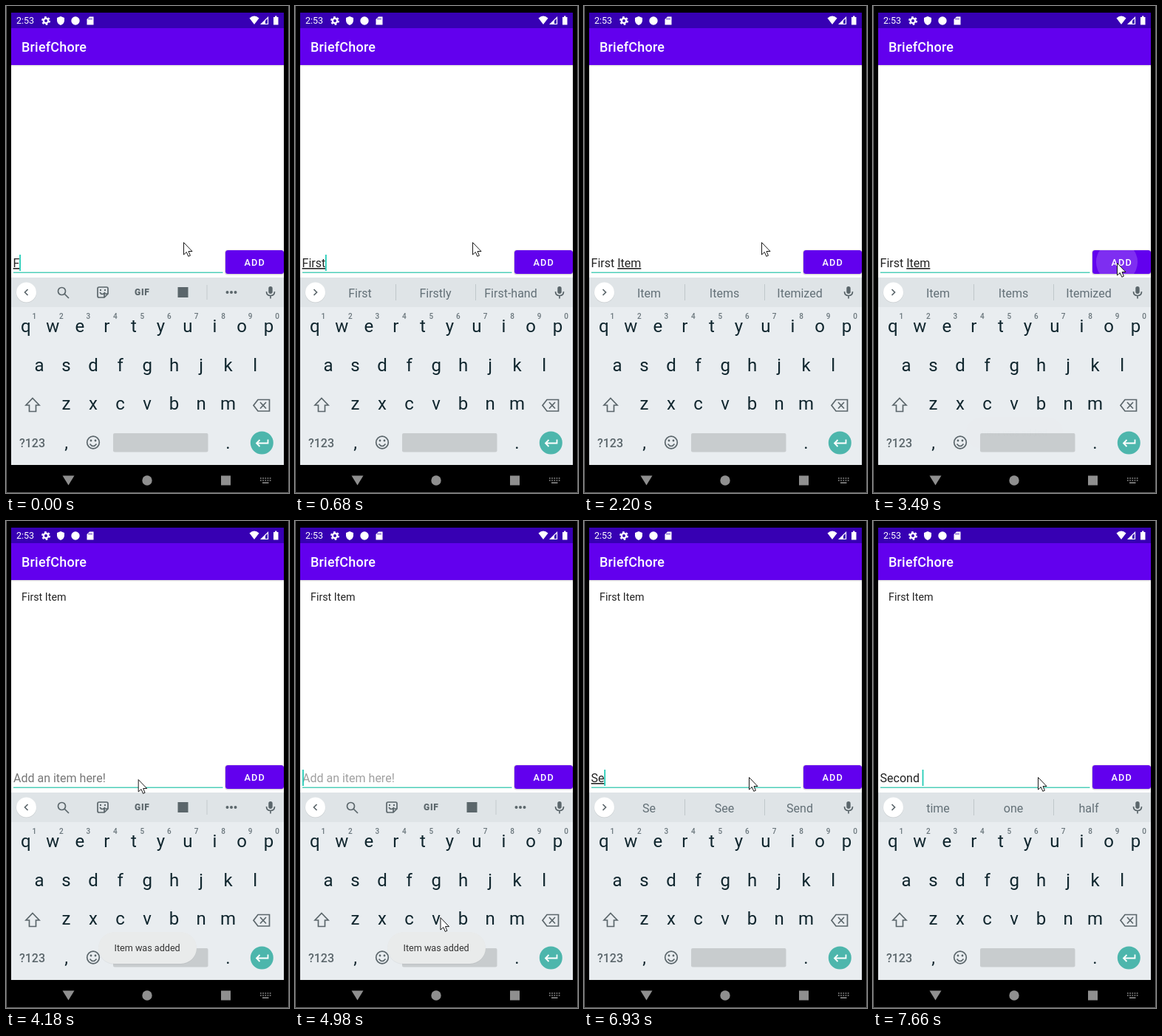
These frames come from a looping animation (383x660 px, 8 s). An HTML page:

```html
<!DOCTYPE html>
<html lang="en">
<head>
<meta charset="utf-8">
<title>Todo app</title>
<style>
  html, body { margin: 0; width: 100%; height: 100%; overflow: hidden; background: #000; }
  svg { display: block; width: 383px; height: 660px; }
  text { font-family: Roboto, "Noto Sans", sans-serif; white-space: pre; }
  .mid { text-anchor: middle; }
  .line { fill: none; stroke: #5b666b; stroke-width: 1.7; }
  .key { font-size: 24px; fill: #10262e; }
  .num { font-size: 10px; font-weight: 500; fill: #69757b; }
  .sug { font-size: 16px; fill: #637077; }
  .sys { fill: #5b666b; }
  .edit { font-size: 16px; fill: #222; }
</style>
</head>
<body>
<svg viewBox="0 0 383 660">
  <defs>
    <clipPath id="btn"><rect x="297" y="331" width="79" height="32" rx="3.5"/></clipPath>
  </defs>
  <path d="M.5 0V659.5H382.5V0" fill="none" stroke="#666"/>

  <!-- status bar and title -->
  <path fill="#fff" d="M7 80H376V368H7Z"/>
  <path fill="#3700b3" d="M7 9H376V30H7Z"/>
  <path fill="#6200ee" d="M7 30H376V80H7Z"/>
  <path opacity=".12" d="M7 80H376V81.5H7Z"/>
  <text x="14" y="24.3" font-size="12.5" fill="#fff">2:53</text>
  <g fill="#fff">
    <circle cx="54" cy="20" r="3.2" fill="none" stroke="#fff" stroke-width="2.4"/>
    <circle cx="54" cy="20" r="5" fill="none" stroke="#fff" stroke-width="2" stroke-dasharray="2.6 2.636"/>
    <path d="M74 14L79 16V20Q78.5 24.5 74 26Q69.5 24.5 69 20V16Z"/>
    <circle cx="94" cy="20" r="5.7"/>
    <path d="M113 14.5H118.5V25.5H109.5V18Z"/>
    <path d="M329.5 16.5Q336 10.5 342.5 16.5L336 25Z"/>
    <path d="M354.5 15.5V24.5H345.5Z" fill="none" stroke="#fff" stroke-width="1.2"/>
    <path d="M351 18.5V25H344.5Z"/>
    <path d="M362 15H364V13.5H366.5V15H368.5V25.5H362Z"/>
  </g>
  <path d="M112 16.5V18.5M114 16.5V18.5M116 16.5V18.5" stroke="#3700b3"/>
  <text x="21" y="62" font-size="18" font-weight="500" letter-spacing=".2" fill="#fff">BriefChore</text>

  <!-- list, field and button -->
  <text id="item" x="21" y="107.5" font-size="14.3" fill="#222">First Item</text>
  <path d="M10 361.3H293.5" stroke="#4fcfba" stroke-width="1.5"/>
  <text id="hint" class="edit" x="10" y="354">Add an item here!</text>
  <text id="typed" class="edit" x="9.6" y="354"><tspan id="done"></tspan><tspan id="word" text-decoration="underline"></tspan></text>
  <rect id="caret" y="337" width="1.8" height="22" fill="#25cdb8"/>
  <rect x="296" y="330.5" width="80" height="34" rx="4" opacity=".15"/>
  <rect x="297" y="331" width="79" height="32" rx="3.5" fill="#6200ee"/>
  <g clip-path="url(#btn)"><circle id="ripple" cx="330" cy="347" fill="#fff"/></g>
  <text class="mid" x="336.7" y="352" font-size="12.7" font-weight="500" letter-spacing="1.2" fill="#fff">ADD</text>

  <!-- keyboard -->
  <path fill="#e9edf0" d="M7 368H376V622H7Z"/>
  <path fill="#dfe4e7" d="M7 368H376V408H7Z"/>
  <circle cx="27.5" cy="388.6" r="13.7" opacity=".1"/>
  <circle cx="27.5" cy="388" r="13.5" fill="#fff"/>
  <path id="chevron" class="line" d="M-2 -4L2 0L-2 4"/>
  <g id="tools">
    <circle class="line" cx="75.5" cy="386.5" r="5"/>
    <path class="line" stroke-width="2" d="M79 390L85 396"/>
    <path class="line" d="M126 381H136Q138 381 138 383V390L133 395H126Q124 395 124 393V383Q124 381 126 381ZM138 390H133V395M127 388Q130 393 134 388"/>
    <path class="sys" d="M127 384H129V386H127ZM133 384H135V386H133Z"/>
    <text class="mid sys" x="184.3" y="392.3" font-size="12" font-weight="900" letter-spacing=".7">GIF</text>
    <rect class="sys" x="232.5" y="381" width="14" height="14"/>
    <path d="M272 378V398" stroke="#c4cacd"/>
    <path d="M299.5 388H312" stroke="#5b666b" stroke-width="4" stroke-linecap="round" stroke-dasharray="0 5.5"/>
  </g>
  <g id="sugs">
    <path d="M136.5 377V399M244.5 377V399" stroke="#c0c7ca"/>
    <text class="sug mid" x="88" y="394.5"></text>
    <text class="sug mid" x="190" y="394.5"></text>
    <text class="sug mid" x="292" y="394.5"></text>
  </g>
  <rect class="sys" x="355.3" y="380" width="5.4" height="10" rx="2.7"/>
  <path class="line" d="M352.5 387Q352.5 392.5 358 392.5T363.5 387M358 392.5V396.5"/>
  <g id="keys"></g>
  <path class="line" d="M36 531.5L45 541H40.5V549.5H31.5V541H27Z"/>
  <path class="line" d="M341 533.5H356.5V549H341L335 541.2ZM344 537L352 545.5M352 537L344 545.5"/>
  <text class="sys mid" x="35.5" y="597.5" font-size="16" font-weight="500">?123</text>
  <circle class="line" cx="118" cy="591.5" r="8.3"/>
  <path class="line" d="M113.5 593.5Q118 599.5 122.5 593.5"/>
  <circle class="sys" cx="115" cy="589" r="1.4"/><circle class="sys" cx="121" cy="589" r="1.4"/>
  <rect x="145" y="579" width="128.5" height="25.5" rx="2" fill="#c8ccce"/>
  <circle cx="346.3" cy="592" r="15.5" fill="#4db6ac"/>
  <path d="M354.5 587.5V592.5H339M343.5 588L339 592.5L343.5 597" fill="none" stroke="#fff" stroke-width="1.8"/>

  <!-- navigation bar -->
  <g fill="#8f8f8f">
    <path d="M76.5 636.5H92.5L84.5 649.5Z"/>
    <circle cx="191" cy="643" r="6.7"/>
    <path d="M291 636.5H304V649.5H291Z"/>
  </g>
  <path d="M344 640H358.5M344 643H358.5" stroke="#8f8f8f" stroke-width="1.6" stroke-dasharray="1.7 1.5"/>
  <path d="M347 646.2H355.5" stroke="#8f8f8f" stroke-width="1.6"/>

  <g id="toast">
    <rect x="125" y="557.5" width="133" height="43.5" rx="21.5" opacity=".05"/>
    <rect x="125" y="557" width="133" height="43" rx="21.5" fill="#e9ebeb"/>
    <text x="146.5" y="583" font-size="12.6" fill="#333">Item was added</text>
  </g>
  <path id="mouse" fill="#fff" stroke="#000" stroke-width=".9" d="M.5 .5V17L4.3 13.5L6.8 19.3L9.4 18.2L7 12.5H12Z"/>
</svg>
<script>
const LOOP = 8000, BLINK = 480, ADDED = 3610;
const TAP = { from: 4180, to: 4300 };

// Bursts of typing: start, ms per letter, letters.
const bursts = [
  [0, 130, "Firs"], [680, 120, "t "], [1340, 120, "Item"],
  [6780, 150, "Se"], [7180, 120, "cond "]
];
// The first slot repeats the word being typed; these follow it.
const guesses = {
  Fi: "Find|First", Fir: "First|Fire", Firs: "First|Fits", First: "Firstly|First-hand",
  I: "In|It", It: "Its|It's", Ite: "Item|Items", Item: "Items|Itemized",
  S: "So|See", Se: "See|Send", Sec: "Second|Secret"
};
const nextWords = { "First ": "of|time|name", "Second ": "time|one|half" };

// Pointer path: time, x, y.
const path = [
  [2480, 240, 320], [2870, 150, 255], [3230, 330, 348], [3760, 330, 348], [4030, 178, 350],
  [4470, 180, 350], [5090, 200, 577], [5610, 222, 336], [5760, 218, 333], [6000, 223, 347]
];

const $ = id => document.getElementById(id);
const clamp = v => Math.min(1, Math.max(0, v));
const progress = (t, from, length) => clamp((t - from) / length);
const show = (id, alpha) => $(id).setAttribute("opacity", +alpha);
const slots = document.querySelectorAll(".sug");

function typedAt(t) {
  let text = "", edited = t < ADDED ? 0 : ADDED;
  for (const [start, gap, letters] of bursts) {
    if (start > t || (start < ADDED && t >= ADDED)) continue;
    const last = Math.min(letters.length - 1, Math.floor((t - start) / gap));
    text += letters.slice(0, last + 1);
    edited = start + last * gap;
  }
  return { text, edited };
}

function suggest(text, word) {
  if (!text || text === "F") return null;
  const list = word ? [word, guesses[word] || "Second|Seconds"].join("|") : nextWords[text];
  return list.split("|");
}

function pointerAt(t) {
  const i = path.findIndex(p => p[0] > t);
  if (i < 1) return path.at(i).slice(1);
  const [t0, x, y] = path[i - 1], [t1, x1, y1] = path[i];
  const k = (t - t0) / (t1 - t0);
  return [x + (x1 - x) * k, y + (y1 - y) * k];
}

function label(x, y, s, cls) {
  const el = document.createElementNS("http://www.w3.org/2000/svg", "text");
  el.setAttribute("x", x);
  el.setAttribute("y", y);
  el.setAttribute("class", "mid " + cls);
  el.textContent = s;
  $("keys").append(el);
}
[["qwertyuiop", 26.8], ["asdfghjkl", 45], ["zxcvbnm", 81.4]].forEach(([row, x0], r) =>
  [...row].forEach((c, i) => {
    const x = x0 + i * 36.53;
    label(x, 442 + r * 52.7, c, "key");
    if (!r) label(x + 11.5, 424.3, (i + 1) % 10, "num");
  }));
label(81.5, 599.5, ",", "key");
label(300.5, 599.5, ".", "key");

function draw(t) {
  const { text, edited } = typedAt(t);
  const cut = text.lastIndexOf(" ") + 1, word = text.slice(cut);
  $("done").textContent = text.slice(0, cut);
  $("word").textContent = word;
  const width = text ? $("typed").getComputedTextLength() : 0;
  $("caret").setAttribute("x", Math.max(10, 9.3 + width));
  show("caret", Math.floor((t - edited) / BLINK) % 2 === 0);
  show("hint", !text);
  $("hint").style.fill = t >= TAP.from && t < TAP.to ? "#777" : "#a0a0a0";
  show("item", t >= ADDED);

  const words = suggest(text, word);
  show("tools", !words);
  show("sugs", !!words);
  words?.forEach((w, i) => slots[i].textContent = w);
  $("chevron").setAttribute("transform", `translate(27.5 388) scale(${words ? 1 : -1} 1)`);

  const press = progress(t, 3490, 390);
  $("ripple").setAttribute("r", t < 3490 ? 0 : 28 + 30 * press);
  show("ripple", .18 * (1 - press));
  show("toast", progress(t, 3490, 390) * (1 - progress(t, 5480, 500)));
  $("mouse").setAttribute("transform", `translate(${pointerAt(t)})`);
}

const start = performance.now();
function loop() {
  draw((performance.now() - start) % LOOP);
  requestAnimationFrame(loop);
}
loop();
</script>
</body>
</html>
```
